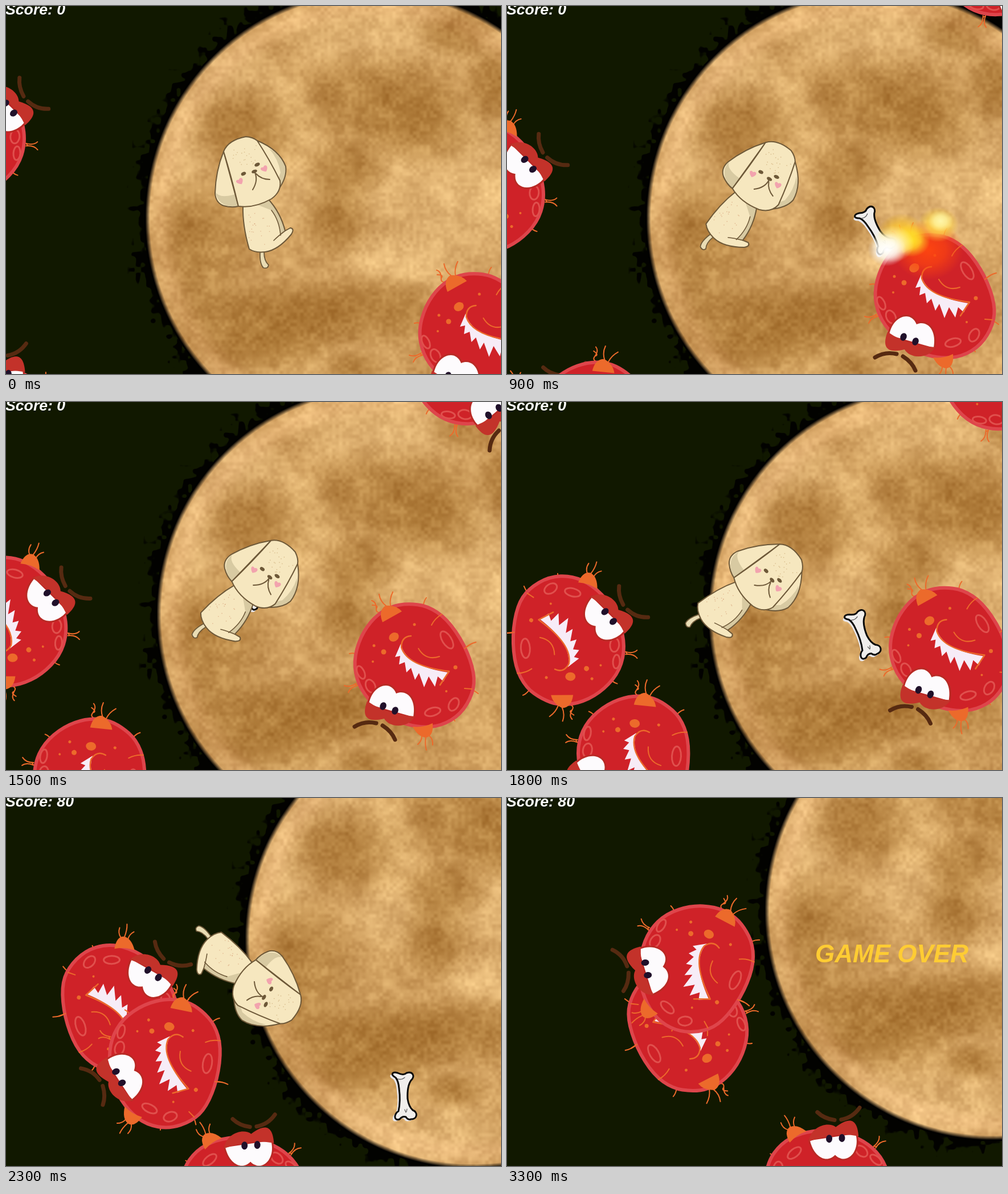
Write an HTML page with a canvas that moves like this. It is 869 px wide and 645 px high and loops after 3.4 s.

```html
<!DOCTYPE html>
<html lang="en">
<head>
<meta charset="utf-8">
<title>Moon game</title>
<style>
html, body { margin: 0; width: 100%; height: 100%; overflow: hidden; background: #111800; }
canvas { display: block; }
</style>
</head>
<body>
<canvas id="stage" width="869" height="645"></canvas>
<script>
const ctx = document.getElementById('stage').getContext('2d');
const LOOP = 3400, STEP = 100, OVER = 2500;
const FONT = '"Liberation Sans", Arial, sans-serif';
const RAD = Math.PI / 180;

// Rows of [time, ...values], linear in between.
function at(keys, t) {
  if (t <= keys[0][0]) return keys[0].slice(1);
  for (let i = 1; i < keys.length; i++) {
    const a = keys[i - 1], b = keys[i];
    if (t <= b[0]) {
      const k = (t - a[0]) / (b[0] - a[0]);
      return a.slice(1).map((v, j) => v + (b[j + 1] - v) * k);
    }
  }
  return keys[keys.length - 1].slice(1);
}

const camera = [[1430, 0, 0], [1500, 20, 0], [1800, 109, 0], [2300, 175, -124], [2500, 208, -174]];
const dogTurn = [[0, 0], [900, 51], [1500, 59], [1800, 69], [2300, 143], [2500, 152]];

// World position and turn of each monster, back to front.
const monsters = [
  { keys: [[0, -17, 732, 156], [3400, 370, 861, 156]] },
  { keys: [[0, -69, 223, -151], [1800, -5, 420, -151], [2300, 22, 494, -166], [2700, 54, 527, -177], [3300, 109, 579, -178]] },
  { keys: [[0, 190, 838, 35], [900, 152, 734, 35], [1500, 130, 665, 35], [1800, 116, 625, 35], [2300, 106, 586, 41], [2700, 114, 542, 57], [3300, 124, 470, 57]] },
  { keys: [[0, 831, 577, 0], [900, 751, 509, 0], [1500, 697, 462, 0], [1900, 659, 424, 0]], end: 1900 },
  { keys: [[0, 973, -117, -56], [900, 867, -85, -56], [1500, 799, -62, -56], [2300, 703, -38, -56]] }
];
const target = monsters[3];

const bones = [
  { from: 600, to: 900, keys: [[600, 440, 324, -29], [900, 647, 394, -29]] },
  { from: 1500, to: 1800, keys: [[1500, 434, 322, -19], [1800, 624, 408, -19]] },
  { from: 1900, to: 2400, keys: [[1900, 434, 322, 0], [2300, 698, 523, 0], [2400, 764, 573, 0]] }
];

/* ---------- drawing helpers ---------- */
function fill(d, color) { ctx.fillStyle = color; ctx.fill(new Path2D(d)); }
function line(d, color, w) {
  ctx.strokeStyle = color; ctx.lineWidth = w;
  ctx.stroke(new Path2D(d));
}
function oval(x, y, rx, ry, turn = 0) {
  ctx.beginPath();
  ctx.ellipse(x, y, rx, ry, turn * RAD, 0, 7);
}
function dot(color, x, y, rx, ry = rx, turn = 0) {
  ctx.fillStyle = color; oval(x, y, rx, ry, turn); ctx.fill();
}
function ring(color, w, x, y, rx, ry, turn) {
  ctx.strokeStyle = color; ctx.lineWidth = w;
  oval(x, y, rx, ry, turn); ctx.stroke();
}
// Draws in a space whose pivot (px, py) lands on (x, y).
function place(x, y, turn, px, py, draw) {
  ctx.save();
  ctx.translate(x, y);
  ctx.rotate(turn * RAD);
  ctx.translate(-px, -py);
  ctx.lineCap = ctx.lineJoin = 'round';
  draw();
  ctx.restore();
}
function blob(c, x, y, rx, ry, rgb, alpha) {
  c.save();
  c.translate(x, y);
  c.scale(rx, ry);
  const g = c.createRadialGradient(0, 0, 0, 0, 0, 1);
  g.addColorStop(0, `rgba(${rgb},${alpha})`);
  g.addColorStop(.5, `rgba(${rgb},${alpha * .7})`);
  g.addColorStop(1, `rgba(${rgb},0)`);
  c.fillStyle = g;
  c.fillRect(-1, -1, 2, 2);
  c.restore();
}

/* ---------- moon ---------- */
function hash(x, y) {
  let h = Math.imul(x, 374761393) + Math.imul(y, 668265263) | 0;
  h = Math.imul(h ^ (h >>> 13), 1274126177);
  return ((h ^ (h >>> 16)) >>> 0) / 4294967296;
}
function noise(x, y, size) {
  x /= size; y /= size;
  const i = Math.floor(x), j = Math.floor(y);
  let u = x - i, v = y - j;
  u *= u * (3 - 2 * u); v *= v * (3 - 2 * v);
  const a = hash(i, j), b = hash(i + 1, j), c = hash(i, j + 1), d = hash(i + 1, j + 1);
  return a + (b - a) * u + (c - a) * v + (a - b - c + d) * u * v - .5;
}

const HALF = 450, R = 398, MX = 645, MY = 372;
const dark = [[650, 165, 150, 85], [735, 210, 110, 70], [790, 45, 65, 45], [865, 140, 60, 70],
  [600, 285, 75, 50], [580, 365, 60, 75], [425, 215, 110, 75], [400, 560, 140, 70],
  [510, 545, 120, 65], [640, 535, 130, 60], [610, 637, 55, 32], [470, 600, 110, 50], [340, 420, 90, 120]];
const light = [[770, 325, 190, 90], [800, 420, 130, 90], [830, 220, 80, 60], [640, 60, 150, 60],
  [390, 120, 90, 70], [320, 230, 55, 110], [500, 330, 70, 60], [680, 440, 90, 50], [500, 200, 55, 70], [540, 720, 220, 60]];

function makeMoon() {
  const cv = document.createElement('canvas');
  cv.width = cv.height = HALF * 2;
  const c = cv.getContext('2d');
  c.fillStyle = 'rgb(211,163,98)';
  c.fillRect(0, 0, HALF * 2, HALF * 2);
  const ox = HALF - MX, oy = HALF - MY;
  for (const [x, y, rx, ry] of light) blob(c, x + ox, y + oy, rx * 1.2, ry * 1.2, '232,188,124', .75);
  for (const [x, y, rx, ry] of dark) blob(c, x + ox, y + oy, rx * 1.15, ry * 1.15, '168,116,50', .72);
  const img = c.getImageData(0, 0, HALF * 2, HALF * 2), p = img.data;
  for (let y = 0, i = 0; y < HALF * 2; y++) {
    for (let x = 0; x < HALF * 2; x++, i += 4) {
      const d = Math.hypot(x - HALF, y - HALF);
      if (d > R + 48) { p[i + 3] = 0; continue; }
      if (d > R + 5) {
        const k = (d - R) / 40 + noise(x, y, 9) * 1.1 + noise(x, y, 26) * .5;
        p[i] = p[i + 1] = 2; p[i + 2] = 0;
        p[i + 3] = 255 * Math.max(0, Math.min(1, (.55 - k) * 6));
        continue;
      }
      const n = noise(x, y, 6) * 24 + noise(x + 99, y, 22) * 22 + noise(x, y + 77, 60) * 26;
      const rim = 16 * Math.max(0, 1 - Math.abs(d - R + 25) / 30);
      const k = Math.max(0, Math.min(1, (R + 3 - d) / 8));
      p[i] = (p[i] + n * .9 + rim) * k;
      p[i + 1] = (p[i + 1] + n + rim * .9) * k;
      p[i + 2] = (p[i + 2] + n * .9 + rim) * k;
    }
  }
  c.putImageData(img, 0, 0);
  return cv;
}

/* ---------- monster ---------- */
const outline = [[-12, -111], [23, -107], [58, -84], [90, -37], [108, 14], [105, 50], [83, 87], [48, 108],
  [8, 111], [-37, 98], [-76, 69], [-101, 34], [-109, -7], [-97, -52], [-72, -87], [-42, -106]];
function smooth(pts) {
  const mid = (a, b) => [(a[0] + b[0]) / 2, (a[1] + b[1]) / 2];
  let d = 'M' + mid(pts[pts.length - 1], pts[0]);
  pts.forEach((p, i) => { d += 'Q' + p + ' ' + mid(p, pts[(i + 1) % pts.length]); });
  return d + 'Z';
}
const shell = smooth(outline.map(([x, y]) => [717 + x * .98, 462 + y * .98]));
const ORANGE = '#ec6a2b', LID = '#c3322a';
const hairs = 'M733 355Q734 348 738 343M747 391Q753 379 765 372M805 432Q813 424 825 421' +
  'M805 502Q818 502 829 511M775 545Q782 550 788 559M603 441Q611 439 619 443' +
  'M594 497Q604 501 615 493M601 509Q604 500 617 497' +
  'M668 358Q657 350 655 337M675 357Q673 345 679 333M660 368Q649 371 650 362Q655 356 643 356M650 362Q650 350 642 348' +
  'M737 587Q735 600 738 610M730 585Q730 594 723 600M743 585Q750 591 749 601';

function monster(x, y, turn) {
  place(x, y, turn, 717, 462, () => {
    line('M612 569Q630 558 650 563M661 567Q677 577 683 592', '#562a11', 7);
    line(hairs, ORANGE, 2);
    fill(shell, '#cf2228');
    line(shell, '#de454b', 6);
    line('M747 391Q753 379 765 372M805 432L815 425M805 502L818 503M613 495L617 497', ORANGE, 2);
    fill('M661 386Q653 366 666 357Q684 355 695 367Z', ORANGE);
    fill('M714 569Q732 571 749 563Q751 585 738 588Q724 588 714 569Z', ORANGE);

    const lobe = (...a) => ring('#e0504d', 3, ...a);
    lobe(623, 474, 6, 12, -25);
    lobe(640, 498, 8, 12, -25);
    lobe(774, 417, 8, 17, -32);
    lobe(749, 543, 14, 7, -15);
    lobe(786, 530, 8, 12, 30);
    dot(ORANGE, 681, 412, 9, 7.5, -30);
    [[646, 427, 2.5], [663, 438, 4.5], [644, 455, 2], [717, 390, 2.5], [789, 465, 3.5], [773, 507, 2]]
      .forEach(s => dot(ORANGE, ...s));

    fill('M693 424L683 447 692 445 690 460 700 456 703 474 711 466 718 487 725 475 734 500 742 481 753 499 758 481 768 490 776 474Q702 463 693 424Z', '#f7ecf7');
    line('M711 410Q694 411 694 430Q704 463 778 472L762 496', ORANGE, 2.5);
    line('M724 432Q737 454 761 446', ORANGE, 2);

    const whites = 'M637 530C642 497 675 485 685 511C703 503 721 520 715 552Z';
    line(whites, '#b92a25', 6);
    fill(whites, '#fdfbfd');
    fill('M634 524C625 549 630 563 664 555C672 570 704 574 718 551Q700 550 680 545Q655 539 634 524Z', LID);
    dot('#20102a', 662, 533, 5.5, 7, 25);
    dot('#20102a', 683, 541, 5.5, 7, 25);
  });
}

/* ---------- dog, bone, blast ---------- */
function dog(turn) {
  const ink = '#6d5838', fur = '#f6e7bf', shade = '#d8caa2';
  place(434.5, 322.5, turn, 434.5, 322.5, () => {
    const tail = 'M446 431Q445 452 452 459Q460 461 461 454Q453 447 453 431Z';
    const body = 'M416 350Q415 385 427 426Q438 433 455 431Q478 428 501 400Q507 390 499 389L490 394Q482 362 460 338Z';
    const leftEar = 'M382 255Q368 290 367 328Q368 345 382 350Q396 354 408 351Z';
    const rightEar = 'M441 236Q480 252 491 281Q494 300 478 322L470 300Z';
    const face = 'M382 255Q390 235 421 229Q434 230 441 236Q462 268 481 306Q484 325 466 338Q436 355 408 351Q396 300 382 255Z';
    fill(tail, '#e9dcb4'); line(tail, ink, 1.8);
    fill(body, fur);
    fill('M440 348L460 338Q481 362 490 395L482 402Q480 372 466 358Z', shade);
    line(body, ink, 2);
    line('M466 358Q480 376 482 402M470 411Q478 403 490 394', ink, 1.6);
    fill(leftEar, fur);
    fill('M368 326Q374 338 402 330L408 351Q372 354 368 326Z', shade);
    line(leftEar, ink, 2);
    fill(rightEar, fur);
    fill('M462 250Q488 263 491 284Q492 302 478 322Q476 306 482 292Q478 268 462 250Z', shade);
    line(rightEar, ink, 2);
    fill(face, fur); line(face, ink, 2);
    for (let i = 0; i < 22; i++) {
      dot('rgba(190,150,95,.55)', 395 + hash(i, 3) * 45, 242 + hash(i, 8) * 36, .8);
      dot('rgba(205,135,95,.5)', 424 + hash(i, 5) * 40, 362 + hash(i, 9) * 58, .8);
    }
    for (const [x, y] of [[411, 307], [454, 285]]) {
      place(x, y, -28, 0, 0, () =>
        fill('M0 6C-10 0-7-7-1-3C4-8 10-1 0 6Z', '#f2a3ae'));
    }
    dot(ink, 417, 294, 4.5, 3, -25);
    dot(ink, 441, 278, 5, 3, -25);
    dot(ink, 436, 290, 5, 3, -20);
    line('M437 292Q443 306 433 322M439 294Q448 304 463 304', ink, 2);
  });
}

function bone(x, y, turn) {
  const d = 'M-14-33C-24-38-20-44-10-41Q0-36 5-41C16-45 21-35 13-28Q6-18 7 4Q9 18 16 24C26 28 24 40 13 40Q8 42 4 36Q-2 34-7 40C-18 44-17 30-9 26Q-5 8-8-14Q-9-27-14-33Z';
  place(x, y, turn, 0, 0, () => {
    ctx.save(); ctx.translate(-4, 3); fill(d, '#e9e7ea'); ctx.restore();
    fill(d, '#f0eeec');
    line(d, '#0a0a0a', 3);
    line('M-11-31Q-4-28 2-33M2 23L4 28M6 22L5 27', '#555', 1.2);
  });
}

function blast(x, y, alpha) {
  const puff = (dx, dy, r, rgb, a) => blob(ctx, x + dx, y + dy, r, r * .85, rgb, a * alpha);
  puff(-12, -82, 62, '255,70,15', .95);
  puff(6, -126, 36, '255,215,70', 1);
  puff(10, -132, 22, '255,250,180', .9);
  puff(-58, -110, 42, '255,200,50', 1);
  puff(-42, -98, 34, '255,225,40', 1);
  puff(-74, -92, 38, '255,245,190', 1);
  puff(-84, -82, 34, '255,255,255', 1);
}

/* ---------- scene ---------- */
const moon = makeMoon();

function label(text, x, y, size, color) {
  ctx.font = `italic bold ${size}px ${FONT}`;
  ctx.fillStyle = color;
  ctx.fillText(text, x, y);
}

function draw(t) {
  const [cx, cy] = at(camera, t);
  ctx.fillStyle = '#111800';
  ctx.fillRect(0, 0, 869, 645);
  ctx.drawImage(moon, MX - HALF + cx, MY - HALF + cy);

  for (const m of monsters) {
    if (t >= (m.end || LOOP)) continue;
    const [x, y, turn] = at(m.keys, t);
    monster(x + cx, y + cy, turn);
  }
  for (const b of bones) if (t >= b.from && t <= b.to) bone(...at(b.keys, t));
  for (const hit of [900, 1900]) {
    if (t < hit || t > hit + 200) continue;
    const [x, y] = at(target.keys, t);
    blast(x + cx, y + cy, 1 - (t - hit) / 300);
  }
  if (t < OVER) dog(at(dogTurn, t)[0]);
  else label('GAME OVER', 541, 288, 44, '#ffcc33');
  label('Score: ' + (t < target.end ? 0 : 80), -1, 15, 26.67, '#fff');
}

const start = performance.now();
let shown = -1;
function tick() {
  const t = Math.floor((performance.now() - start) % LOOP / STEP) * STEP;
  if (t !== shown) draw(shown = t);
  requestAnimationFrame(tick);
}
tick();
</script>
</body>
</html>
```
